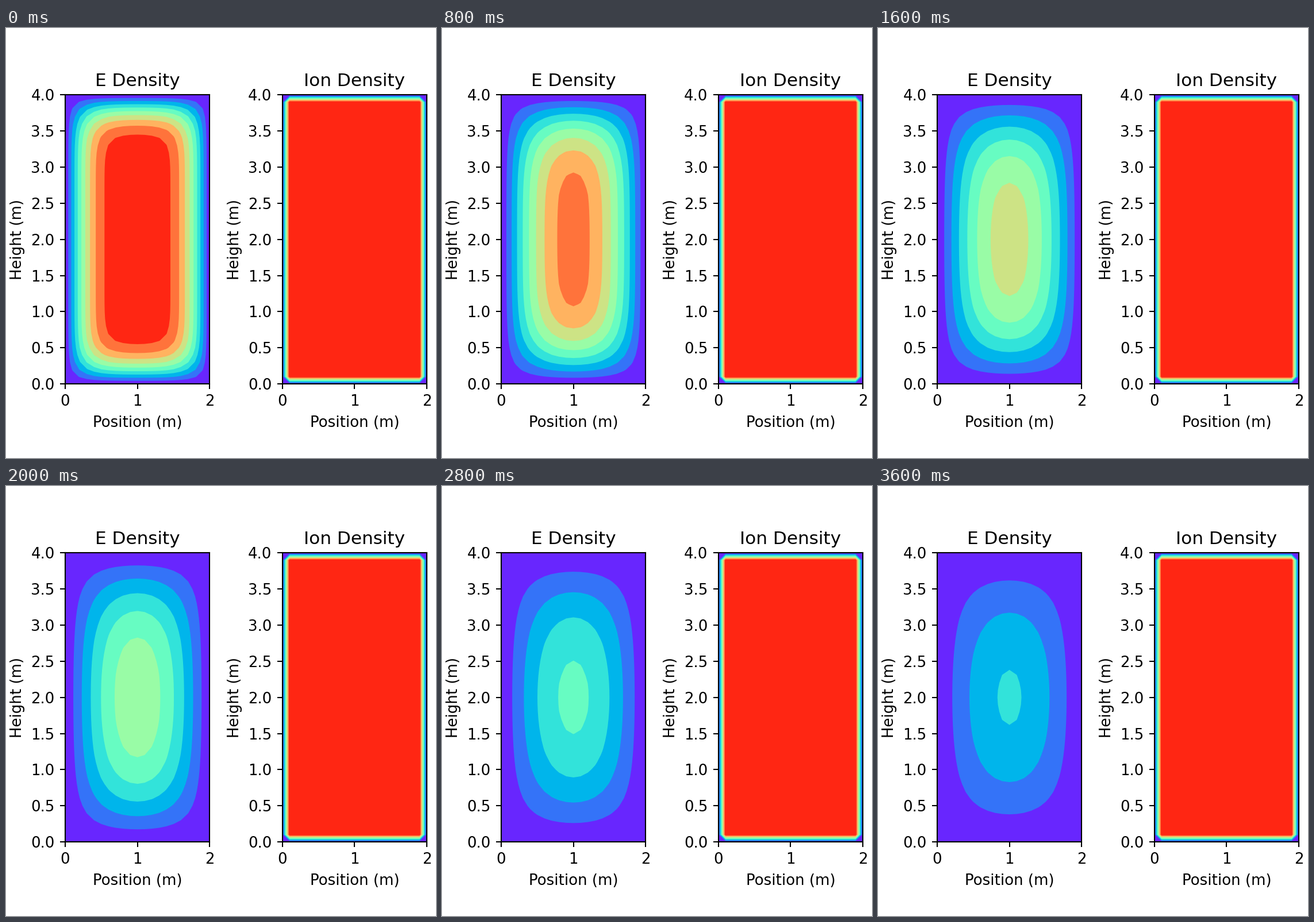
Animation, 748 px wide and 748 px high, one loop 4600 ms. Source, as a matplotlib script:

```python
import numpy as np
import matplotlib.pyplot as plt
from matplotlib.animation import FuncAnimation

SIZE, DPI = 748, 187
STEPS = 21          # relaxation steps per picture
PICTURES = 10
TICK = 200          # ms

plt.rcParams["font.family"] = "DejaVu Sans"

x = np.linspace(0, 2, 21)
y = np.linspace(0, 4, 41)
levels = np.arange(10) / 10
colors = plt.get_cmap("rainbow")(levels + 0.05)


def uniform():
    u = np.zeros((len(y), len(x)))
    u[1:-1, 1:-1] = 1
    return u


def diffuse(u, steps):
    for _ in range(steps):
        v = u.copy()
        v[1:-1, 1:-1] = (u[2:, 1:-1] + u[:-2, 1:-1]
                         + u[1:-1, 2:] + u[1:-1, :-2]) / 4
        u = v
    return u


def make_axes(fig, left, title):
    ax = fig.add_axes([left / SIZE, 1 - 619 / SIZE, 251.3 / SIZE, 502.6 / SIZE])
    ax.set(xlim=(0, 2), ylim=(0, 4), xticks=[0, 1, 2],
           yticks=np.arange(0, 4.1, 0.5), title=title,
           xlabel="Position (m)", ylabel="Height (m)")
    ax.set_facecolor(colors[0])
    ax.autoscale(False)
    return ax


def paint(ax, u):
    """Stack the bands from low to high so that no seams show."""
    return [ax.contourf(x, y, u, [low, 2], colors=[c], antialiased=True)
            for low, c in zip(levels[1:], colors[1:]) if low < u.max()]


fig = plt.figure(figsize=(SIZE / DPI, SIZE / DPI), dpi=DPI, facecolor="white")
electrons = make_axes(fig, 103, "E Density")
ions = make_axes(fig, 480.7, "Ion Density")
paint(ions, uniform())

fields = [diffuse(uniform(), STEPS * (k + 1)) for k in range(PICTURES)]
bands = []


def update(i):
    while bands:
        bands.pop().remove()
    k = min(i * TICK // 400, PICTURES - 1)
    bands.extend(paint(electrons, fields[k]))
    return []


anim = FuncAnimation(fig, update, frames=23, interval=TICK,
                     init_func=lambda: [], repeat=True, blit=False)
plt.show()
```
